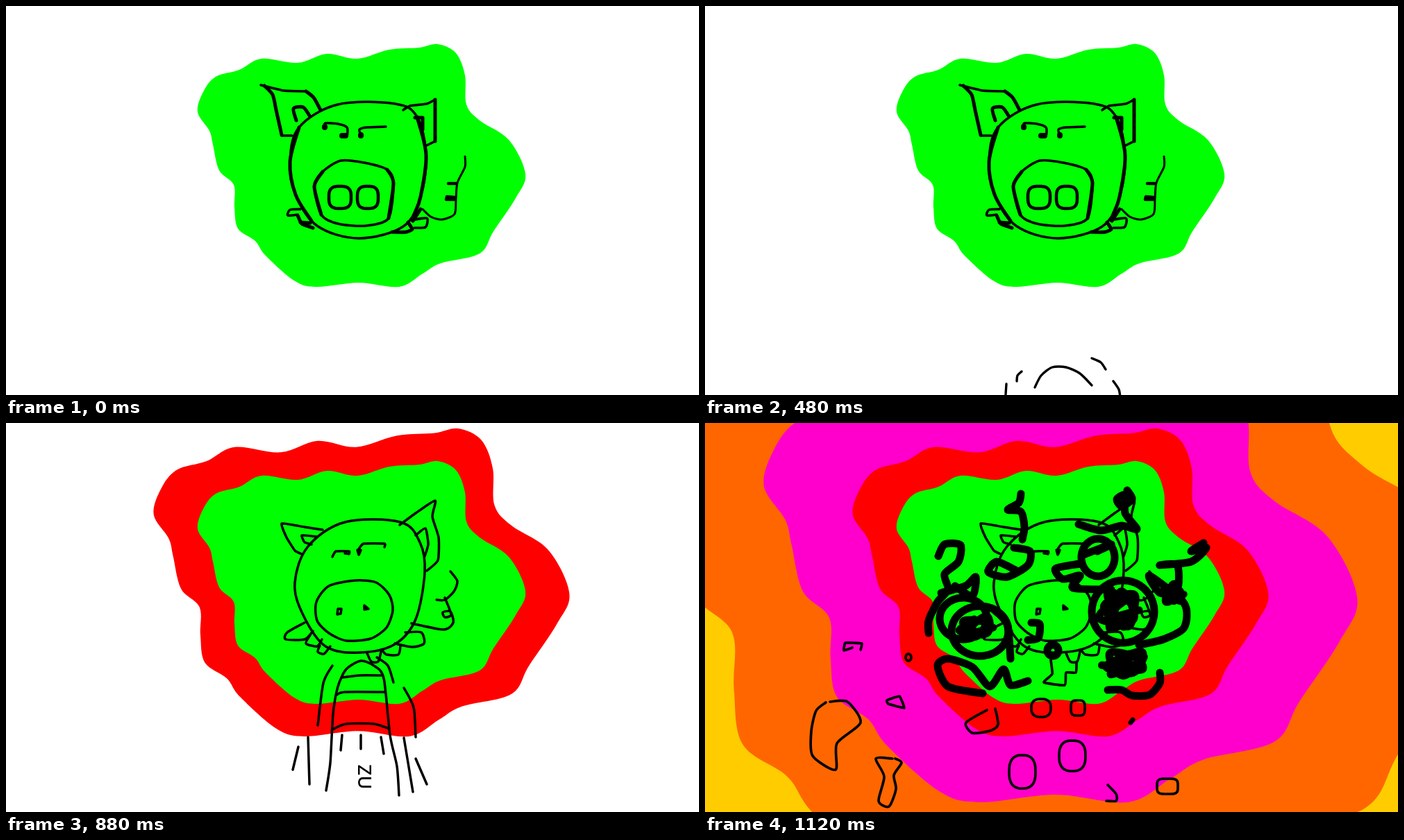
These frames come from a looping animation (998 px wide and 561 px high, 1.2 s). An HTML page with a canvas:

```html
<!DOCTYPE html>
<html lang="en">
<head>
<meta charset="utf-8">
<title>Pig and rocket</title>
<style>
  html, body { margin: 0; width: 100%; height: 100%; overflow: hidden; background: #fff; }
  canvas { display: block; }
</style>
</head>
<body>
<canvas id="stage" width="998" height="561"></canvas>
<script>
const ctx = document.getElementById('stage').getContext('2d');
const STEP = 80, COUNT = 15;

// Smooth path through points; bend 0 gives straight segments.
function smooth(pts, closed, bend) {
  const len = pts.length;
  const at = i => pts[closed ? (i + len) % len : Math.max(0, Math.min(len - 1, i))];
  const path = new Path2D();
  path.moveTo(...pts[0]);
  for (let i = 0; i < (closed ? len : len - 1); i++) {
    const [a, b, c, d] = [at(i - 1), at(i), at(i + 1), at(i + 2)];
    path.bezierCurveTo(
      b[0] + (c[0] - a[0]) * bend, b[1] + (c[1] - a[1]) * bend,
      c[0] - (d[0] - b[0]) * bend, c[1] - (d[1] - b[1]) * bend, ...c);
  }
  if (closed) path.closePath();
  return path;
}

function trace(text, bend) {
  const pts = text.match(/\d+ \d+/g).map(p => p.split(' ').map(Number));
  return smooth(pts, text.endsWith('z'), bend);
}

const cache = new Map();
function line(text, bend = 0.13) {
  if (!cache.has(text)) cache.set(text, text.split('|').map(t => trace(t, bend)));
  for (const path of cache.get(text)) ctx.stroke(path);
}

const pen = width => { ctx.lineWidth = width; };

// Superellipse: power 2 is round, higher is boxier.
function egg(cx, cy, rx, ry, power = 2.6) {
  const curl = v => Math.sign(v) * Math.abs(v) ** (2 / power);
  ctx.beginPath();
  for (let a = 0; a < 6.28; a += 0.1) {
    ctx.lineTo(cx + rx * curl(Math.cos(a)), cy + ry * curl(Math.sin(a)));
  }
  ctx.closePath();
  ctx.stroke();
}

// Seeded scribble that wanders inside an ellipse.
function knot(cx, cy, rx, ry, count, seed) {
  const rand = () => (seed = (seed * 16807) % 2147483647) / 2147483647;
  const pts = Array.from({ length: count }, (_, i) => {
    const a = i * 2.3 + rand(), r = 0.55 + 0.45 * rand();
    return [cx + rx * r * Math.cos(a), cy + ry * r * Math.sin(a)];
  });
  ctx.stroke(smooth(pts, false, 0.2));
}

const blob = trace('276 153 284 124 302 102 336 92 368 76 420 82 462 69 506 76 552 63 595 60 ' +
  '622 55 648 68 661 100 663 142 682 165 724 193 748 242 734 277 702 325 682 357 ' +
  '626 371 600 386 566 405 508 399 447 405 415 396 374 360 359 339 334 321 329 290 ' +
  '328 258 307 237 298 200 293 180z', 1 / 6);

function angryPig() {
  pen(3.5);
  line('478 142 560 141 592 160 605 215 597 275 572 318 508 335 448 317 417 272 409 225 422 175z', 1 / 6);
  line('482 223 516 226 549 236 558 255 551 306 518 317 478 314 454 301 444 260 456 239z');
  line('459 174 460 169 478 170 491 175 491 187 483 187|511 186 509 178 520 175 547 174');
  line('367 114 400 122 432 123|397 187 412 187|572 150 582 144 606 141 618 135|618 195 604 202', 0.07);
  line('424 293 409 294 406 302 420 301|584 309 606 306 604 319 588 320');
  pen(5);
  line('422 175 409 225 417 272 440 310|592 160 605 215 597 275 588 300', 1 / 6);
  line('456 239 444 260 454 301|549 236 558 255 551 306');
  line('372 115 384 128 389 150 397 186|432 123 443 132 453 150|618 135 618 195|418 165 414 148 428 146 437 158');
  line('589 161 600 161 600 178', 0);
  line('420 302 426 314 442 320|424 312 438 313|556 326 576 326 585 322 579 312|586 310 597 293', 0.08);
  pen(4.5);
  egg(481, 276, 16, 16, 3);
  egg(521, 276, 15, 16, 3);
  pen(8);
  line('459 174 459 175|484 187 489 187|511 186 511 187');
  pen(3);
  line('661 217 661 232 650 255 648 278 646 300 628 308 612 304 600 293');
  pen(4.5);
  line('637 256 648 256|646 279 634 279 635 275 646 276', 0);
}

function calmPig() {
  pen(3.5);
  line('515 142 567 146 601 182 605 235 586 297 548 331 510 335 450 310 420 268 418 205 440 163z', 1 / 6);
  line('470 228 512 224 545 231 562 250 560 285 542 312 515 314 480 311 455 298 442 278 445 250z');
  egg(481, 273, 10, 10, 4);
  line('521 260 512 262 508 272 511 278 522 279z', 0.05);
  line('464 185 472 180 495 180 495 188 483 186|516 187 508 185 511 177 535 175 535 178', 0.06);
  line('456 148 443 134 418 124 378 122 388 150 398 166 428 176|442 160 425 149 416 152 434 172', 0.08);
  line('566 148 590 140 617 136 618 196 606 202|588 161 600 158 597 172', 0.05);
  line('432 292 415 294 402 302 412 306 428 299|426 299 428 307 436 308 432 290|438 302 430 318 446 311');
  line('582 305 600 307 613 318 600 320 582 312|575 312 570 322 576 327 585 318|554 329 566 330 570 318');
  line('660 213 659 235 648 256 636 256 636 252 648 254 648 276 630 276 642 279 644 296 632 305 590 293', 0.09);
}

function widePig() {
  pen(3.5);
  line('488 143 568 143 596 172 603 215 590 283 560 319 510 331 460 322 427 275 416 230 435 178z', 1 / 6);
  line('503 227 533 230 552 248 557 270 548 295 525 311 490 314 465 303 448 285 447 258 465 235z');
  line('478 268 483 268 482 275 477 276z|516 263 522 268 516 269z', 0);
  line('470 193 475 185 494 185 494 189 488 188|508 190 506 183 511 183 508 190 508 182 515 174 545 174 545 179', 0.07);
  line('456 154 430 150 397 145 404 165 416 184 426 189|448 164 426 162 430 172 440 175', 0.07);
  line('567 147 590 130 618 112 614 135 623 165 622 198 606 213|590 162 604 152 608 175 603 192', 0.1);
  line('430 288 405 302 403 312 430 312 442 300|438 306 432 318 448 322 455 312|452 321 449 330 458 333 467 322');
  line('575 302 598 302 602 318 585 323 560 318|568 322 565 334 548 334 542 328|520 332 526 344 536 344 540 330');
  line('640 214 650 228 645 243 632 255 620 255|632 252 641 276 632 280 629 273 640 272 644 288 630 298 584 289');
}

function nose() {
  pen(3.4);
  line('475 550 484 533 500 521 520 521 540 530 557 547|557 508 570 514 577 524');
  line('456 527 450 533 449 541|434 545 433 560|588 541 596 553 598 565');
}

function climb() {
  pen(3.5);
  line('473 549 473 510 484 470 512 436 550 468 565 520 575 554', 1 / 6);
  line('485 471 505 467 530 467 552 479|474 517 490 512 545 512 566 521');
  line('470 438 460 466 450 508|436 514 432 557|561 436 576 465 580 502|589 526 598 543 598 560');
}

function rocket() {
  pen(3.5);
  line('461 550 467 510 471 440 478 400 490 375 511 363 530 370 544 388 553 470 563 515 566 557');
  line('484 387 510 384 540 384|476 412 488 408 545 408|472 461 490 454 530 454 552 461');
  line('470 370 457 395 449 456|435 473 437 541|421 487 413 520|534 358 550 370 558 394');
  line('573 402 587 430 590 473|573 474 586 552|590 504 606 541|484 470 482 492|511 470 511 490|540 473 544 497');
}

function wreck() {
  pen(3.5);
  line('449 549 442 514 465 512 470 446 447 434 464 402 455 386 500 355 518 337 540 352 574 415 566 435 580 460 582 549', 0.1);
  line('482 359 565 356|458 387 490 376 525 377 550 386|462 416 500 412 540 410 574 422');
  line('424 395 407 394 405 436 420 403|406 455 404 475 378 520 414 527 415 490 436 470 420 459');
  line('592 422 590 443 598 438z|502 430 499 465|557 455 558 470|436 347 440 356 452 357|495 541 526 545|496 554 510 548');
  pen(11);
  egg(540, 450, 8, 6, 4);
  egg(534, 541, 7, 6, 3);
}

function burst() {
  pen(16);
  line('345 82 350 74 380 72 405 83 420 100 440 108 447 95 432 88 420 108');
  line('440 130 460 132 462 120 490 123 505 132 530 130 530 120|348 163 350 200');
  line('317 213 345 205 390 218|328 300 362 328 400 315');
  knot(363, 257, 35, 52, 24, 7);
  line('465 212 472 200 485 208 490 225 505 248 480 260 468 240|400 315 430 322 470 335');
  knot(457, 322, 16, 13, 6, 5);
  pen(12);
  line('390 215 395 180 415 163|447 155 440 180 425 225 418 235 480 247|445 158 480 163 508 160|545 280 625 325');
  pen(14);
  line('570 162 595 163|575 165 565 190 548 200 575 215 570 235 550 250 600 245 560 260 600 260');
  line('545 333 600 312 625 325 590 345 650 350 655 367 580 350');
  line('622 222 645 220 655 245 640 268 655 240 672 230 680 250 700 265 690 285 660 298 662 315');
}

function tangle() {
  pen(11);
  line('455 102 452 115 436 125 455 128 460 150 457 168|445 180 468 185 465 205 435 222 408 215 420 200 447 212');
  line('336 192 345 175 368 176 365 200 345 218 350 240 335 258 322 285 322 303');
  line('340 245 375 235 390 222 385 250 360 235|415 268 435 290 440 340|470 288 482 290 480 310 465 313');
  egg(396, 300, 41, 36, 2);
  egg(372, 282, 34, 30, 2);
  knot(393, 295, 30, 22, 11, 3);
  egg(501, 328, 8, 8, 2);
  line('400 390 350 380 335 350 350 340 385 352 410 380 430 355 440 378 465 372');
  line('608 97 615 110 600 120 593 110 605 104 605 130 622 153 600 148 570 155 538 146');
  egg(566, 194, 24, 27, 2);
  line('565 185 585 175 545 190|540 203 505 210 515 225 540 220 530 238 585 240');
  egg(602, 272, 45, 45, 2);
  knot(598, 270, 36, 34, 14, 11);
  knot(605, 348, 38, 24, 13, 9);
  line('580 385 600 385 615 393 640 392 655 375 655 360');
  line('718 173 700 185 722 180 700 200 655 205 680 205 680 240 655 245 640 220 690 260 690 295 660 312 625 320');
  knot(675, 247, 18, 16, 7, 4);
}

function debris() {
  pen(3.7);
  line('224 327 226 318 202 317 200 328 212 324|262 400 280 394 287 411 264 405z', 0.05);
  line('180 402 205 402 224 432 190 462 188 500 155 480 153 445 160 415 174 403');
  line('274 484 283 490 272 508 275 528 265 553 250 545 258 510 246 484 270 484');
  line('406 414 376 432 385 447 410 444 422 435 418 412|580 522 592 535 592 545 578 545');
  line('498 342 500 362 488 374 518 378 520 360 534 360 535 345', 0.08);
  egg(293, 338, 4, 5, 2);
  egg(484, 411, 14, 13);
  egg(537, 411, 10, 11, 3.5);
  egg(529, 480, 19, 22);
  egg(457, 503, 19, 24);
  egg(666, 524, 15, 11, 4);
  pen(7);
  line('613 432 616 428');
}

function label(text, x, y) {
  ctx.save();
  ctx.translate(x, y);
  ctx.rotate(Math.PI / 2);
  ctx.font = '500 26px Inter, sans-serif';
  ctx.fillStyle = '#000';
  ctx.fillText(text, 0, 0);
  ctx.restore();
}

// Run a drawing enlarged about a point and shifted down.
function placed(x, y, scale, dy, paint) {
  ctx.save();
  ctx.translate(x, y + dy);
  ctx.scale(scale, scale);
  ctx.translate(-x, -y);
  paint();
  ctx.restore();
}

const shift = (dy, paint) => placed(0, 0, 1, dy, paint);
const labelled = () => { rocket(); label('ZU', 507, 512); };

const scenes = {
  6: nose,
  7: () => shift(42, climb),
  8: climb,
  9: () => shift(36, labelled),
  10: labelled,
  11: () => shift(-20, labelled),
  12: () => { wreck(); label('ZUV', 494, 478); burst(); },
  13: () => { placed(500, 380, 0.6, 0, debris); tangle(); },
  14: () => { debris(); tangle(); }
};

const rings = [
  { color: '#f60', scale: 2.57, from: 13 },
  { color: '#f0c', scale: 1.81, from: 12 },
  { color: '#f00', scale: 1.268, from: 11 },
  { color: '#0f0', scale: 1, from: 0 }
];
const pigs = [angryPig, calmPig, widePig];

function draw(step) {
  ctx.fillStyle = step === 14 ? '#fc0' : '#fff';
  ctx.fillRect(0, 0, 998, 561);
  for (const { color, scale, from } of rings) {
    if (step < from) continue;
    ctx.fillStyle = color;
    placed(512, 230, scale, 0, () => ctx.fill(blob));
  }
  ctx.strokeStyle = '#000';
  ctx.lineCap = ctx.lineJoin = 'round';
  pigs[step % 3]();
  if (scenes[step]) scenes[step]();
}

const start = performance.now();
function tick(now) {
  draw(Math.floor(Math.max(0, now - start) / STEP) % COUNT);
  requestAnimationFrame(tick);
}
draw(0);
requestAnimationFrame(tick);
</script>
</body>
</html>
```
